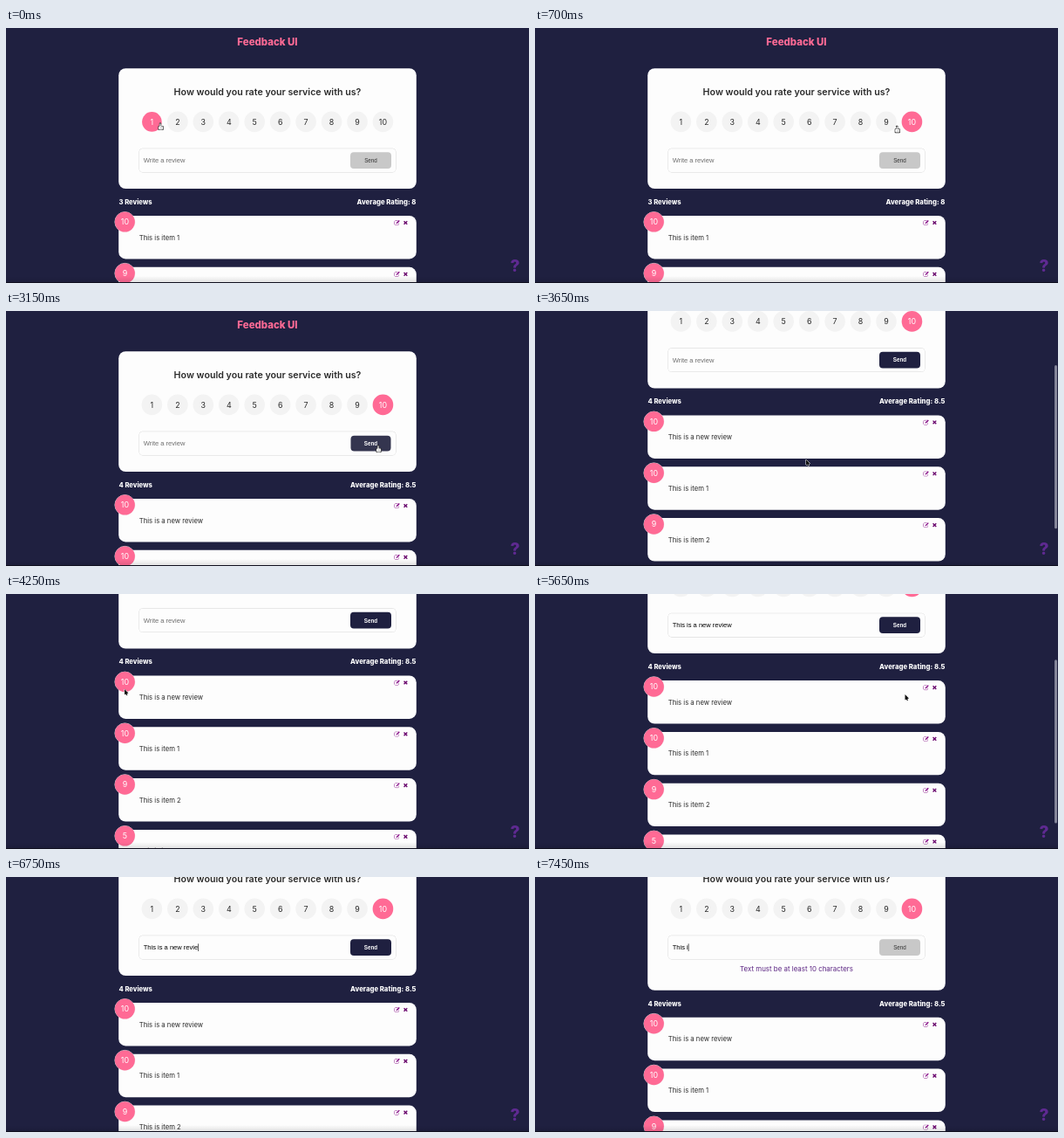
An HTML page with a canvas for the animation above (7500 ms loop, 600 by 292 pixels).

```html
<!DOCTYPE html>
<html lang="en">
<head>
<meta charset="utf-8">
<title>Feedback UI</title>
<style>
  html, body { margin: 0; width: 100%; height: 100%; overflow: hidden; background: #1f2040; }
  canvas { display: block; width: 600px; height: 292px; }
</style>
</head>
<body>
<canvas id="stage"></canvas>
<script>
const W = 600, H = 292, LOOP = 7500;
const PINK = '#ff6a95', NAVY = '#1f2040', PURPLE = '#800080', INK = '#2b2b2b', PAPER = '#fdfdfd';
const UI = 'Inter, sans-serif', FIELD = '"Liberation Sans", Arial, sans-serif';
const REVIEW = 'This is a new review', MIN_CHARS = 10, PAGE_H = 453, MSG_H = 16.8;
const CLICK_TEN = 560, FOCUS = 1080, SEND = 3080, EDIT = 5500, REFOCUS = 6560;

const canvas = document.getElementById('stage');
const ctx = canvas.getContext('2d');
const dpr = window.devicePixelRatio || 1;
canvas.width = W * dpr;
canvas.height = H * dpr;

const button = { x: 395, y: 142.2, w: 47, h: 18.8 };
const field = { x: 153, y: 138.2, w: 294, h: 26.8 };

// Pointer travel: each move eases to its end point
const home = { x: 177, y: 109 };
const moves = [
  { from: 60, to: 480, x: 432, y: 109 },
  { from: 640, to: 1000, x: 212, y: 151 },
  { from: 2560, to: 2940, x: 427, y: 154 },
  { from: 3200, to: 3480, x: 311, y: 170 },
  { from: 3860, to: 4250, x: 136, y: 109 },
  { from: 4300, to: 4460, x: 121, y: 112 },
  { from: 4820, to: 5330, x: 448, y: 101 },
  { from: 5540, to: 5800, x: 388, y: 137 },
  { from: 6060, to: 6460, x: 230, y: 80 }
];

const clamp = (v, a, b) => Math.min(b, Math.max(a, v));

function ramp(t, from, to) {
  const u = clamp((t - from) / (to - from), 0, 1);
  return u * u * (3 - 2 * u);
}

function pointerAt(t) {
  return moves.reduce((p, m) => {
    const u = ramp(t, m.from, m.to);
    return { x: p.x + (m.x - p.x) * u, y: p.y + (m.y - p.y) * u };
  }, home);
}

const scrollAt = t => 121.5 * ramp(t, 3230, 3830) - 50.5 * ramp(t, 5540, 6075);
const pulse = (t, on, off) => ramp(t, on, on + 50) - ramp(t, off, off + 150);

function fieldLength(t) {
  if (t < SEND) return clamp(Math.floor((t - 1150) / 70), 0, REVIEW.length);
  if (t < EDIT) return 0;
  return REVIEW.length - clamp(Math.floor((t - 6700) / 50), 0, 14);
}

function stateAt(t) {
  const n = fieldLength(t);
  const short = n > 0 && n < MIN_CHARS;
  const scroll = scrollAt(t);
  const { x, y } = pointerAt(t);
  return {
    t, x, y, short, scroll,
    pageY: y + scroll,
    text: REVIEW.slice(0, n),
    rating: t < CLICK_TEN ? 1 : 10,
    enabled: !short && (n > 0 || t >= SEND),
    scores: t < SEND ? [10, 9, 5] : [10, 10, 9, 5],
    bar: pulse(t, 3230, 4060) + pulse(t, 5540, 6450),
    caret: (t >= FOCUS && t < SEND) || t >= REFOCUS,
    hidden: (t >= 1200 && t < 2560) || t >= 6750
  };
}

const within = (s, r) => s.x > r.x && s.x < r.x + r.w && s.pageY > r.y && s.pageY < r.y + r.h;

function box(x, y, w, h, r, fill, stroke) {
  ctx.beginPath();
  ctx.roundRect(x, y, w, h, r);
  if (stroke) { ctx.strokeStyle = stroke; ctx.lineWidth = 0.8; ctx.stroke(); }
  if (fill) { ctx.fillStyle = fill; ctx.fill(); }
}

function disc(x, y, r, fill, stroke) {
  box(x - r, y - r, 2 * r, 2 * r, r, fill, stroke);
}

function label(str, x, y, size, color, { weight = 400, align = 'left', font = UI } = {}) {
  ctx.font = `${weight} ${size}px ${font}`;
  ctx.textAlign = align;
  ctx.fillStyle = color;
  ctx.fillText(str, x, y);
}

function line(color, width, x1, y1, x2, y2) {
  ctx.beginPath();
  ctx.moveTo(x1, y1);
  ctx.lineTo(x2, y2);
  ctx.strokeStyle = color;
  ctx.lineWidth = width;
  ctx.stroke();
}

function drawRatings(s) {
  const y = 107.4;
  for (let n = 1; n <= 10; n++) {
    const x = 167.4 + 29.45 * (n - 1);
    const hover = !s.hidden && Math.hypot(s.x - x, s.pageY - y) < 11.8;
    const on = hover || n === s.rating;
    disc(x, y, hover ? 11.3 : 11.8, on ? PINK : '#f3f3f3');
    label(n, x, y + 3.2, 8.9, on ? '#fff' : INK, { align: 'center' });
  }
}

function drawField(s) {
  box(field.x, field.y, field.w, field.h, 3.5, PAPER, '#cfcfcf');
  label(s.text || 'Write a review', 157.7, 154.2, 7.55, s.text ? '#000' : '#6d6d6d', { font: FIELD });
  if (s.caret) {
    const w = s.text ? ctx.measureText(s.text).width : 0;
    line('#111', 0.7, 158.1 + w, 147.4, 158.1 + w, 156);
  }

  const hover = !s.hidden && s.enabled && within(s, button);
  const inset = hover ? 0.5 : 0;
  const fill = s.enabled ? (hover ? '#34354f' : NAVY) : '#c8c8c8';
  box(button.x + inset, button.y + inset, button.w - 2 * inset, button.h - 2 * inset, 4, fill);
  label('Send', 418.5, 154, 6.3, s.enabled ? '#fff' : '#333',
    { weight: s.enabled ? 700 : 400, align: 'center', font: FIELD });
}

function drawForm(s) {
  box(129.2, 46.2, 341.6, 137.8 + (s.short ? MSG_H : 0), 8, PAPER);
  label('How would you rate your service with us?', 300, 77, 10.7, INK, { weight: 600, align: 'center' });
  drawRatings(s);
  drawField(s);
  if (s.short) {
    label('Text must be at least 10 characters', 300, 178.6, 7.92, '#5b2482', { align: 'center' });
  }
}

function drawIcons(y) {
  const edit = 448.2, close = 458.4, r = 1.85;
  box(edit - 2.3, y - 2.1, 4.6, 4.6, 0.9, PAPER, PURPLE);
  line(PAPER, 2.4, edit + 0.4, y + 0.3, edit + 3.2, y - 2.5);
  line(PURPLE, 1.3, edit - 0.2, y + 0.8, edit + 3.1, y - 2.5);
  for (const d of [-r, r]) line('#68006c', 1.35, close - r, y - d, close + r, y + d);
}

function drawReviews(s) {
  const count = s.scores.length;
  const mean = s.scores.reduce((a, b) => a + b) / count;
  label(`${count} Reviews`, 129.5, 201.8, 7.6, '#fff', { weight: 800 });
  label(`Average Rating: ${mean}`, 470.5, 201.8, 7.75, '#fff', { weight: 800, align: 'right' });

  s.scores.forEach((score, i) => {
    const y = 215 + i * 58.8, item = i - (count - 3) + 1;
    box(129.2, y, 341.6, 49.4, 8, PAPER);
    disc(136.4, y + 7.1, 11.5, PINK, '#eee');
    label(score, 136.4, y + 10.3, 8.9, '#fff', { align: 'center' });
    label(item ? `This is item ${item}` : REVIEW, 152.7, y + 27.5, 7.7, INK);
    drawIcons(y + 8);
  });
}

function drawHand() {
  for (const grow of [0.6, 0]) {
    const fill = grow ? '#222' : '#fff';
    const part = (x, y, w, h) => box(x - grow, y - grow, w + 2 * grow, h + 2 * grow, 0.8, fill);
    part(-0.6, 0.2, 1.2, 5);
    part(-1.9, 3.6, 5, 3.8);
  }
  for (const x of [0.7, 2]) line('#555', 0.4, x, 4.6, x, 6.4);
}

function drawBeam() {
  line('#222', 0.8, 0, -4, 0, 4);
  for (const y of [-4.2, 4.2]) line('#222', 0.8, -1.5, y, 1.5, y);
}

function drawArrow() {
  ctx.beginPath();
  ctx.moveTo(0, 0);
  ctx.lineTo(0, 6.2);
  ctx.lineTo(4.4, 4.4);
  ctx.closePath();
  ctx.strokeStyle = '#fff';
  ctx.lineWidth = 1;
  ctx.stroke();
  line('#fff', 2, 1.7, 4.4, 3.1, 7.4);
  line('#111', 1.2, 1.7, 4.4, 2.9, 7);
  ctx.fillStyle = '#111';
  ctx.fill();
  ctx.beginPath();
  ctx.moveTo(0, 0);
  ctx.lineTo(0, 6.2);
  ctx.lineTo(4.4, 4.4);
  ctx.fill();
}

function drawPointer(s) {
  const ratings = { x: 155, y: 95, w: 290, h: 24 };
  const editIcon = { x: 444, y: 218, w: 9, h: 10 };
  const link = within(s, ratings) || (s.enabled && within(s, button)) || (s.t > SEND && within(s, editIcon));
  ctx.save();
  ctx.translate(s.x, s.y);
  if (link) drawHand();
  else if (within(s, field)) drawBeam();
  else drawArrow();
  ctx.restore();
}

function drawBottomShade() {
  const shade = ctx.createLinearGradient(0, H - 8, 0, H);
  shade.addColorStop(0, 'rgba(0,0,0,0)');
  shade.addColorStop(1, 'rgba(0,0,0,0.12)');
  ctx.fillStyle = shade;
  ctx.fillRect(0, H - 8, W, 8);
  ctx.fillStyle = '#10101f';
  ctx.fillRect(0, H - 1, W, 1);
}

function draw(t) {
  const s = stateAt(t);
  ctx.setTransform(dpr, 0, 0, dpr, 0, 0);
  ctx.fillStyle = NAVY;
  ctx.fillRect(0, 0, W, H);

  ctx.save();
  ctx.translate(0, -s.scroll);
  label('Feedback UI', 300, 19.7, 11.45, PINK, { weight: 800, align: 'center' });
  drawForm(s);
  if (s.short) ctx.translate(0, MSG_H);
  drawReviews(s);
  ctx.restore();

  label('?', 584, 279, 19, '#5f2a92', { weight: 800, align: 'center' });
  if (s.bar > 0) {
    ctx.globalAlpha = s.bar;
    box(596, s.scroll * H / PAGE_H + 0.5, 3, H * H / PAGE_H - 1, 1.5, '#85869a');
    ctx.globalAlpha = 1;
  }
  drawBottomShade();
  if (!s.hidden) drawPointer(s);
}

const start = performance.now();
function tick() {
  draw((performance.now() - start) % LOOP);
  requestAnimationFrame(tick);
}
tick();
</script>
</body>
</html>
```
